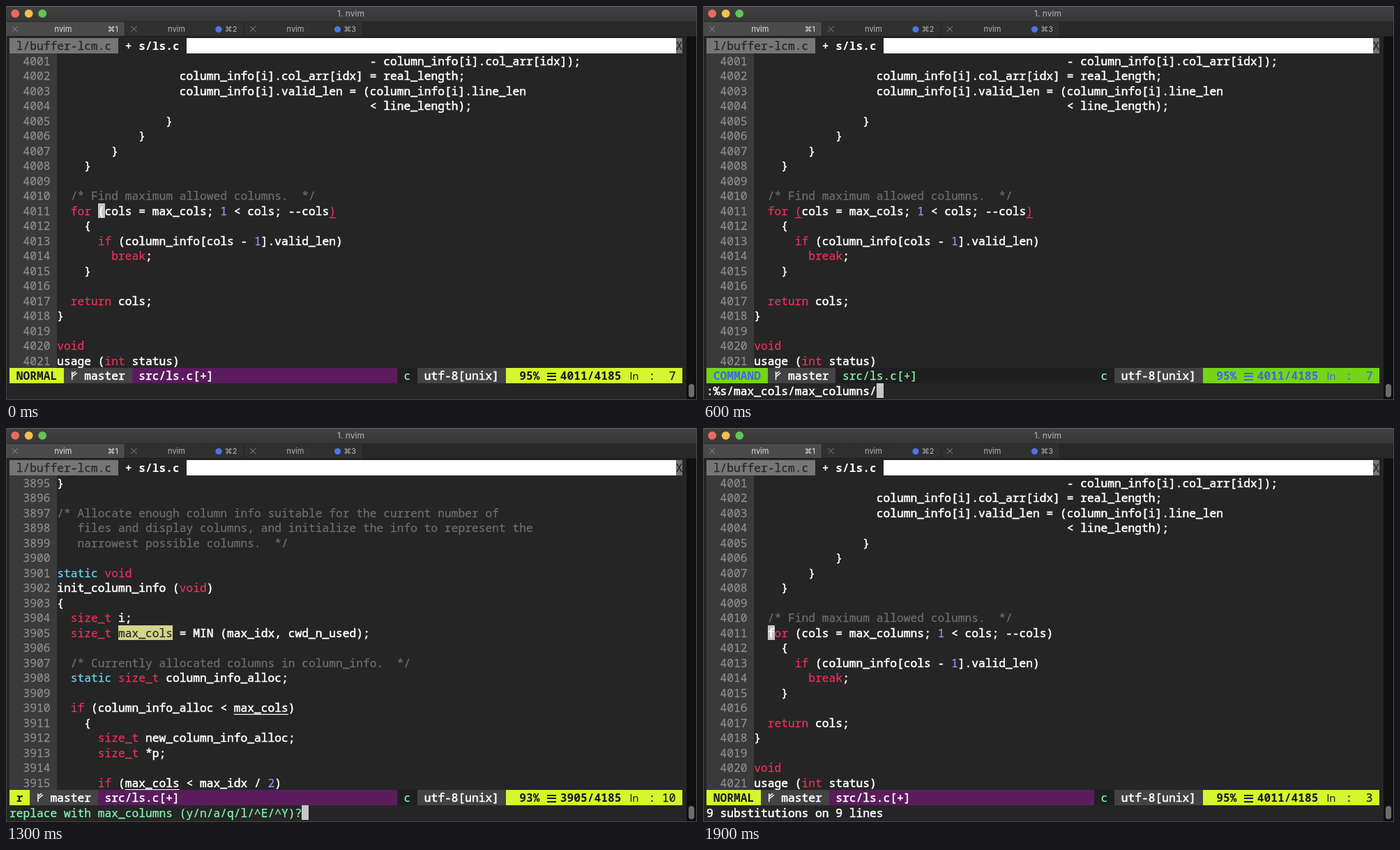
These frames come from a looping animation (991x565 px, 2 s). An HTML page with a canvas:

```html
<!DOCTYPE html>
<html lang="en">
<head>
<meta charset="utf-8">
<title>Substitute in the editor</title>
<style>
html, body { margin: 0; width: 100%; height: 100%; overflow: hidden; background: #252526; }
canvas { display: block; }
</style>
</head>
<body>
<canvas id="stage" width="991" height="565"></canvas>
<script>
const ctx = document.getElementById('stage').getContext('2d');
const LOOP = 2000, STEP = 100;
const LEFT = 5, TOP = 46.2, CW = 9.75, RH = 21.5, BASE = 17;
const MONO = '16.25px "Noto Sans Mono", monospace';
const UI = 'Inter, "DejaVu Sans", sans-serif';

const C = {
  bg: '#252526', gutter: '#3a3a3a', lineNo: '#8c8c8c', text: '#ffffff',
  comment: '#6e6e6e', red: '#ea3159', cyan: '#70d2ee', number: '#a886f2',
  lime: '#d4f62c', purple: '#5b1c5e', green: '#75d515', blue: '#3a6be0',
  mint: '#8af8b2', segment: '#434343', dark: '#1f1f20', ink: '#16162a',
  cursor: '#c6c6c6', match: '#d2d58a', tab: '#767676'
};

const loopCode = limit => [
  ' '.repeat(46) + '- column_info[i].col_arr[idx]);',
  ' '.repeat(18) + 'column_info[i].col_arr[idx] = real_length;',
  ' '.repeat(18) + 'column_info[i].valid_len = (column_info[i].line_len',
  ' '.repeat(46) + '< line_length);',
  ' '.repeat(16) + '}',
  ' '.repeat(12) + '}',
  ' '.repeat(8) + '}',
  '    }',
  '',
  '  /* Find maximum allowed columns.  */',
  `  for (cols = ${limit}; 1 < cols; --cols)`,
  '    {',
  '      if (column_info[cols - 1].valid_len)',
  '        break;',
  '    }',
  '',
  '  return cols;',
  '}',
  '',
  'void',
  'usage (int status)'
];

const initCode = [
  '}',
  '',
  '/* Allocate enough column info suitable for the current number of',
  '   files and display columns, and initialize the info to represent the',
  '   narrowest possible columns.  */',
  '',
  'static void',
  'init_column_info (void)',
  '{',
  '  size_t i;',
  '  size_t max_cols = MIN (max_idx, cwd_n_used);',
  '',
  '  /* Currently allocated columns in column_info.  */',
  '  static size_t column_info_alloc;',
  '',
  '  if (column_info_alloc < max_cols)',
  '    {',
  '      size_t new_column_info_alloc;',
  '      size_t *p;',
  '',
  '      if (max_cols < max_idx / 2)'
];

const colX = col => LEFT + col * CW;
const rowY = row => TOP + row * RH;

function rect(x, y, w, h, color) {
  ctx.fillStyle = color;
  ctx.fillRect(x, y, w, h);
}

function line(color, width, ...points) {
  ctx.strokeStyle = color;
  ctx.lineWidth = width;
  ctx.beginPath();
  points.forEach(([x, y], i) => i ? ctx.lineTo(x, y) : ctx.moveTo(x, y));
  ctx.stroke();
}

function dot(x, y, r, color) {
  ctx.fillStyle = color;
  ctx.beginPath();
  ctx.arc(x, y, r, 0, 7);
  ctx.fill();
}

function cells(col, row, count, color) {
  const x = Math.round(colX(col)), y = Math.round(rowY(row));
  rect(x, y, Math.round(colX(col + count)) - x, Math.round(rowY(row + 1)) - y, color);
}

// Each character sits in its own terminal cell.
function put(str, col, row, color, bold = false) {
  ctx.font = (bold ? 'bold ' : '') + MONO;
  ctx.textAlign = 'left';
  ctx.textBaseline = 'alphabetic';
  ctx.fillStyle = ctx.strokeStyle = color;
  ctx.lineWidth = color === C.text ? 0.55 : 0.25;
  [...str].forEach((ch, i) => {
    if (ch === ' ') return;
    const x = colX(col + i), y = rowY(row) + BASE;
    ctx.fillText(ch, x, y);
    if (!bold) ctx.strokeText(ch, x, y);
  });
}

function underline(col, row, count, color) {
  rect(colX(col), Math.round(rowY(row) + 20), count * CW, 1.2, color);
}

function cursor(col, row, ch = '') {
  cells(col, row, 1, C.cursor);
  put(ch, col, row, C.text);
}

function label(str, x, y, size, color, align = 'center') {
  ctx.font = `${size}px ${UI}`;
  ctx.textAlign = align;
  ctx.textBaseline = 'middle';
  ctx.fillStyle = color;
  ctx.fillText(str, x, y);
}

function tokenColor(word) {
  if (word === 'static') return C.cyan;
  if (/^(for|if|break|return|void|int|size_t)$/.test(word)) return C.red;
  return /^\d+$/.test(word) ? C.number : C.text;
}

function drawCode(lines, first) {
  const top = Math.round(rowY(1));
  rect(LEFT, top, Math.round(colX(7)) - LEFT, Math.round(rowY(22)) - top, C.gutter);
  let comment = false;
  lines.forEach((str, i) => {
    const row = i + 1;
    put(String(first + i), 2, row, C.lineNo);
    if (str.includes('/*')) comment = true;
    if (comment) put(str, 7, row, C.comment);
    else for (const m of str.matchAll(/\w+|[^\w\s]+/g)) put(m[0], 7 + m.index, row, tokenColor(m[0]));
    if (str.includes('*/')) comment = false;
  });
}

function drawWindow() {
  rect(0, 0, 991, 565, C.bg);
  const shade = ctx.createLinearGradient(0, 0, 0, 22);
  shade.addColorStop(0, '#414141');
  shade.addColorStop(1, '#373737');
  rect(0, 0, 991, 22, shade);
  rect(0, 0, 991, 1, '#606060');
  ['#ec6a5e', '#f4be4f', '#61c454'].forEach((color, i) => dot(13.2 + i * 19.5, 10.8, 5.9, color));
  label('1. nvim', 494.5, 11.5, 12, '#b8b8b8');

  rect(0, 22, 991, 22, '#282828');
  rect(0, 22, 170, 22, '#4b4b4b');
  rect(170, 22, 342, 22, '#303030');
  rect(0, 22, 991, 1, '#2a2a2a');
  rect(0, 43, 991, 1, '#1c1c1c');
  for (let i = 0; i < 3; i++) {
    const x = i * 170.5;
    const color = i ? '#b4b4b4' : '#e4e4e4';
    line('#858585', 1, [x + 9, 29], [x + 17, 37]);
    line('#858585', 1, [x + 17, 29], [x + 9, 37]);
    label('nvim', x + (i ? 74 : 82), 33.5, 11, color);
    label('⌘' + (i + 1), x + 161, 33.5, 11, color, 'right');
    if (i) dot(x + 134.5, 33.5, 4.6, '#4d76e6');
    rect(Math.round(x + 170), 23, 1, 20, '#242424');
  }

  rect(976, 44, 14, 521, '#101010');
  ctx.fillStyle = '#6c6c6c';
  ctx.beginPath();
  ctx.roundRect(979, 542, 8, 19, 4);
  ctx.fill();
  rect(990, 0, 1, 565, '#505050');
  rect(0, 0, 1, 565, '#484848');
  rect(0, 564, 991, 1, '#484848');

  cells(0, 0, 16, C.tab);
  put('l/buffer-lcm.c', 1, 0, '#262626');
  put('+ s/ls.c', 17, 0, C.text, true);
  cells(26, 0, 72, '#ffffff');
  cells(98, 0, 1, C.tab);
  put('X', 98, 0, '#262626');
}

function drawBranch(x, y) {
  line('#eeeeee', 1.6, [x + 2, y + 5], [x + 2, y + 17]);
  line('#eeeeee', 1.6, [x + 2, y + 9], [x + 7, y + 5]);
  line('#eeeeee', 1.6, [x + 2, y + 12.5], [x + 9, y + 7]);
}

function drawStatus(mode, percent, lineNo, column) {
  const row = 22, command = mode === 'COMMAND';
  const accent = command ? C.green : C.lime;
  const ink = command ? C.blue : C.ink;
  const width = mode.length + 2;
  const file = width + 10;
  const y = rowY(row);

  cells(0, row, 99, C.dark);
  cells(0, row, width, accent);
  put(mode, 1, row, ink, true);
  cells(width, row, 10, C.segment);
  drawBranch(colX(width + 1), y);
  put('master', width + 3, row, C.text);
  if (!command) cells(file, row, 57 - file, C.purple);
  put('src/ls.c[+]', file + 1, row, command ? C.mint : C.text);
  put('c', 58, row, C.mint);
  cells(60, row, 13, C.segment);
  put('utf-8[unix]', 61, row, C.text);

  cells(73, row, 26, accent);
  put(percent + '%', 75, row, ink, true);
  for (let i = 0; i < 3; i++) rect(776, Math.round(y + 6.5 + i * 4.5), 13, 2, ink);
  put(lineNo + '/4185', 81, row, ink, true);
  ctx.font = '15px "Noto Sans", sans-serif';
  ctx.fillText('ln', 894.5, y + BASE);
  put(':', 94, row, ink);
  put(String(column).padStart(2), 96, row, ink);
}

function drawPrompt(str, color, caret) {
  put(str, 0, 23, color);
  if (caret) cursor(str.length, 23);
}

function drawPointer(x, y) {
  const beam = (color, width) => {
    line(color, width, [x, y - 6], [x, y + 6]);
    for (const s of [-1, 1]) line(color, width, [x - 3, y + s * 8], [x, y + s * 6], [x + 3, y + s * 8]);
    line(color, width, [x - 2, y + 3], [x + 2, y + 3]);
  };
  beam('#111111', 2.6);
  beam('#f0f0f0', 1.2);
}

function typedCount(step) {
  return step <= 3 ? step * 3 : Math.floor(9 + (step - 3) * 16 / 3 + 0.2);
}

function drawEditing(step) {
  drawCode(loopCode('max_cols'), 4001);
  cells(47, 11, 1, C.bg);
  put(')', 47, 11, C.red);
  underline(47, 11, 1, C.red);
  if (step === 0) {
    cursor(13, 11, '(');
    drawStatus('NORMAL', 95, 4011, 7);
    return;
  }
  cells(13, 11, 1, C.bg);
  put('(', 13, 11, C.red);
  underline(13, 11, 1, C.red);
  drawStatus('COMMAND', 95, 4011, 7);
  drawPrompt(':%s/max_cols/max_columns/'.slice(0, typedCount(step)), C.text, true);
}

function drawConfirm(step) {
  drawCode(initCode, 3895);
  cells(16, 11, 8, C.match);
  put('max_cols', 16, 11, '#2a2a2a');
  underline(33, 16, 8, C.text);
  underline(17, 21, 8, C.text);
  drawStatus('r', 93, 3905, 10);
  drawPrompt('replace with max_columns (y/n/a/q/l/^E/^Y)?', C.mint, true);
  if (step === 18) drawPointer(462.5, 153.5);
}

function drawDone() {
  drawCode(loopCode('max_columns'), 4001);
  cursor(9, 11, 'f');
  drawStatus('NORMAL', 95, 4011, 3);
  drawPrompt('9 substitutions on 9 lines', C.text, false);
}

const start = performance.now();

function render() {
  const step = Math.floor((performance.now() - start) % LOOP / STEP);
  drawWindow();
  if (step < 7) drawEditing(step);
  else if (step < 19) drawConfirm(step);
  else drawDone();
  requestAnimationFrame(render);
}

render();
</script>
</body>
</html>
```
